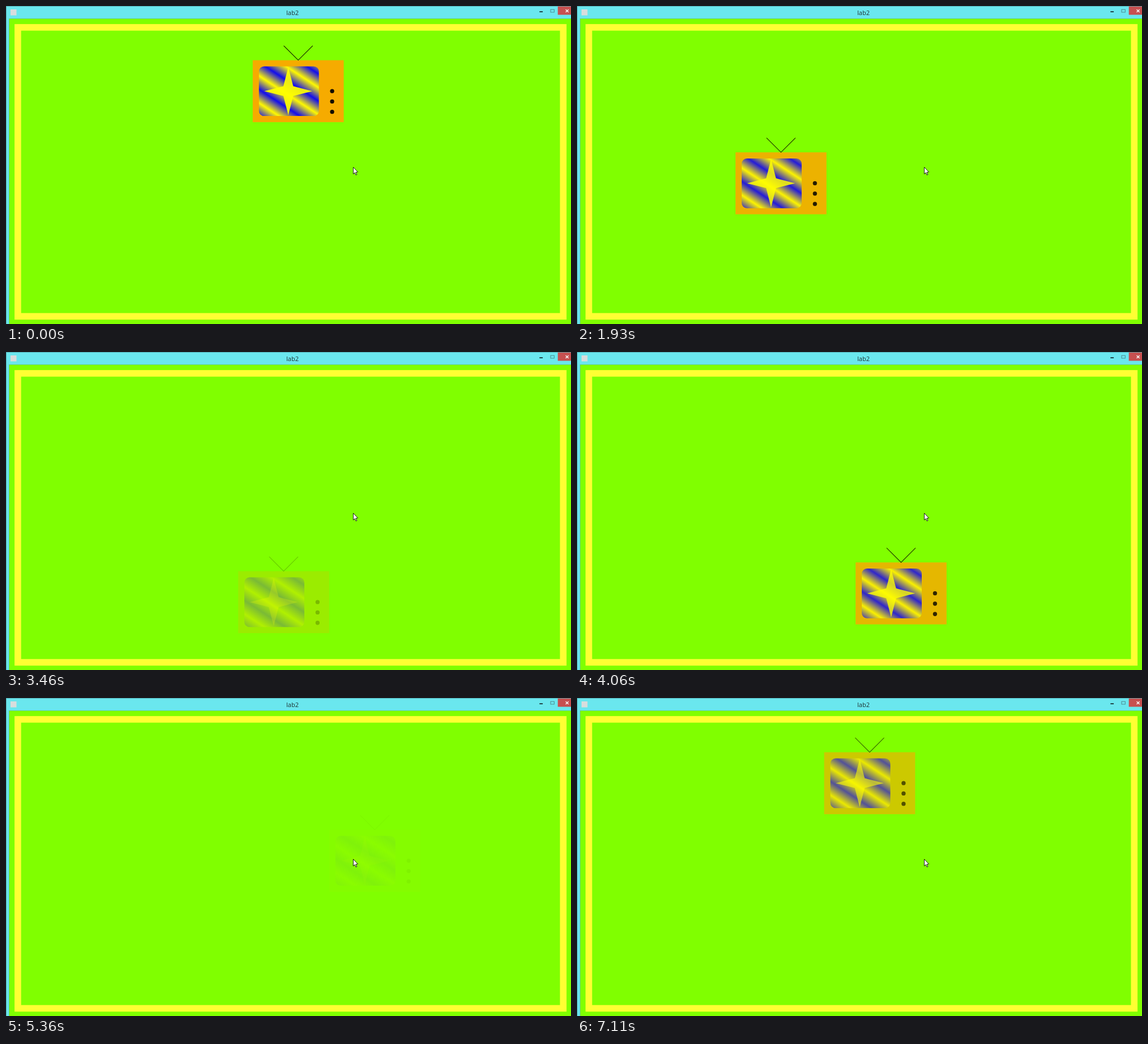
An HTML page with a canvas for the animation above (7160 ms loop, 998 by 561 pixels).

```html
<!DOCTYPE html>
<html lang="en">
<head>
<meta charset="utf-8">
<title>lab2</title>
<style>
  html, body { margin: 0; width: 998px; height: 561px; overflow: hidden; }
  canvas { display: block; }
</style>
</head>
<body>
<canvas id="stage" width="998" height="561"></canvas>
<script>
const ctx = document.getElementById('stage').getContext('2d');
const LOOP = 7160, FIRST = 40, STEP = 54, SCALE = 0.7306, ORBIT = 200 * SCALE;

// Key points of the orbit: repaint number, degrees counterclockwise from the top
const path = [[0, -4.2], [15, 36.6], [36, 96.6], [64, 174.1], [87, 237.7], [113, 309.2], [132, 355.5]];

function repaints(t) {
  return t < FIRST ? 0 : Math.floor(t / STEP + 0.8);
}

function angleAt(n) {
  const i = Math.max(1, path.findIndex(([end]) => n <= end));
  const [n0, a0] = path[i - 1], [n1, a1] = path[i];
  return a0 + (a1 - a0) * (n - n0) / (n1 - n0);
}

// Opacity runs back and forth between 1 and 0, twenty steps each way
function opacityAt(angle) {
  const p = (1.45 + (angle + 4.3) * 0.3519) % 40;
  return Math.abs(p - 20) / 20;
}

function rect(color, x, y, w, h) {
  ctx.fillStyle = color;
  ctx.fillRect(x, y, w, h);
}

function trace(points) {
  ctx.beginPath();
  points.forEach(([x, y]) => ctx.lineTo(x, y));
}

function line(color, width, ...points) {
  ctx.strokeStyle = color;
  ctx.lineWidth = width;
  trace(points);
  ctx.stroke();
}

// Repeating yellow and blue stripes; each half period spans (15, -23)
function makeStripes() {
  const x = 86, y = 75, shift = 0.27, reach = 4;
  const from = -reach - shift, to = reach - shift;
  const g = ctx.createLinearGradient(x + from * 15, y - from * 23, x + to * 15, y - to * 23);
  for (let i = 0; i <= 2 * reach; i++) {
    g.addColorStop(i / (2 * reach), i % 2 ? '#0000ff' : '#ffff00');
  }
  return g;
}
const stripes = makeStripes();

function drawWindow() {
  rect('#6ae7ee', 0, 0, 998, 561);
  rect('#4d9fa6', 0, 0, 998, 0.8);
  rect('#4d9fa6', 0, 0, 0.8, 561);
  rect('#5ab8b4', 5.1, 21.9, 993, 540);
  rect('#80ff00', 5.8, 22.6, 993, 539);

  ctx.strokeStyle = '#ffff33';
  ctx.lineWidth = 11.6;
  ctx.strokeRect(20.9, 37.7, 963.4, 509.8);

  rect('#d9dddd', 8, 6, 10.5, 10.5);
  ctx.fillStyle = '#1f3436';
  ctx.font = '11px "Open Sans", "Noto Sans", sans-serif';
  ctx.textAlign = 'center';
  ctx.fillText('lab2', 506, 15.5);

  rect('#102022', 942.3, 9.4, 5.8, 1.6);
  ctx.strokeStyle = '#4a8085';
  ctx.lineWidth = 0.9;
  ctx.strokeRect(962, 6.2, 6.3, 4.8);
  rect('#c75050', 974.7, 0.8, 24, 14.7);
  line('#ffffff', 1.3, [988.6, 6.2], [993.6, 11]);
  line('#ffffff', 1.3, [993.6, 6.2], [988.6, 11]);
}

function drawTv(x, y, alpha) {
  ctx.save();
  ctx.translate(x, y);
  ctx.scale(SCALE, SCALE);
  ctx.globalAlpha = alpha;

  rect('#ffa500', 0, 0, 220, 149.6);

  ctx.fillStyle = stripes;
  ctx.beginPath();
  ctx.roundRect(15, 14.8, 145, 120, 12.5);
  ctx.fill();

  const star = [];
  for (let i = 0; i < 8; i++) {
    const r = i % 2 ? 16.8 : 58, a = i * Math.PI / 4;
    star.push([86 + r * Math.sin(a), 74.6 - r * Math.cos(a)]);
  }
  ctx.fillStyle = '#ffff00';
  trace(star);
  ctx.fill();

  ctx.fillStyle = '#000000';
  for (let i = 0; i < 3; i++) {
    ctx.beginPath();
    ctx.arc(192, 74.6 + i * 25, 5, 0, Math.PI * 2);
    ctx.fill();
  }

  line('#000000', 1.4, [75, -35], [110, 0], [145, -35]);
  ctx.restore();
}

function drawCursor() {
  ctx.save();
  ctx.translate(613.4, 284.3);
  ctx.scale(SCALE, SCALE);
  trace([[0, 0], [0, 16.5], [3.7, 13.2], [6.3, 19], [8.7, 18], [6.2, 12.3], [11.1, 11.8]]);
  ctx.closePath();
  ctx.fillStyle = '#ffffff';
  ctx.fill();
  ctx.strokeStyle = '#000000';
  ctx.lineWidth = 1.2;
  ctx.stroke();
  ctx.restore();
}

function frame(t) {
  const angle = angleAt(repaints(t));
  const a = angle * Math.PI / 180;
  drawWindow();
  drawTv(425.1 - ORBIT * Math.sin(a), 241.35 - ORBIT * Math.cos(a), opacityAt(angle));
  drawCursor();
}

const begin = performance.now();
function tick() {
  frame((performance.now() - begin) % LOOP);
  requestAnimationFrame(tick);
}
tick();
</script>
</body>
</html>
```
